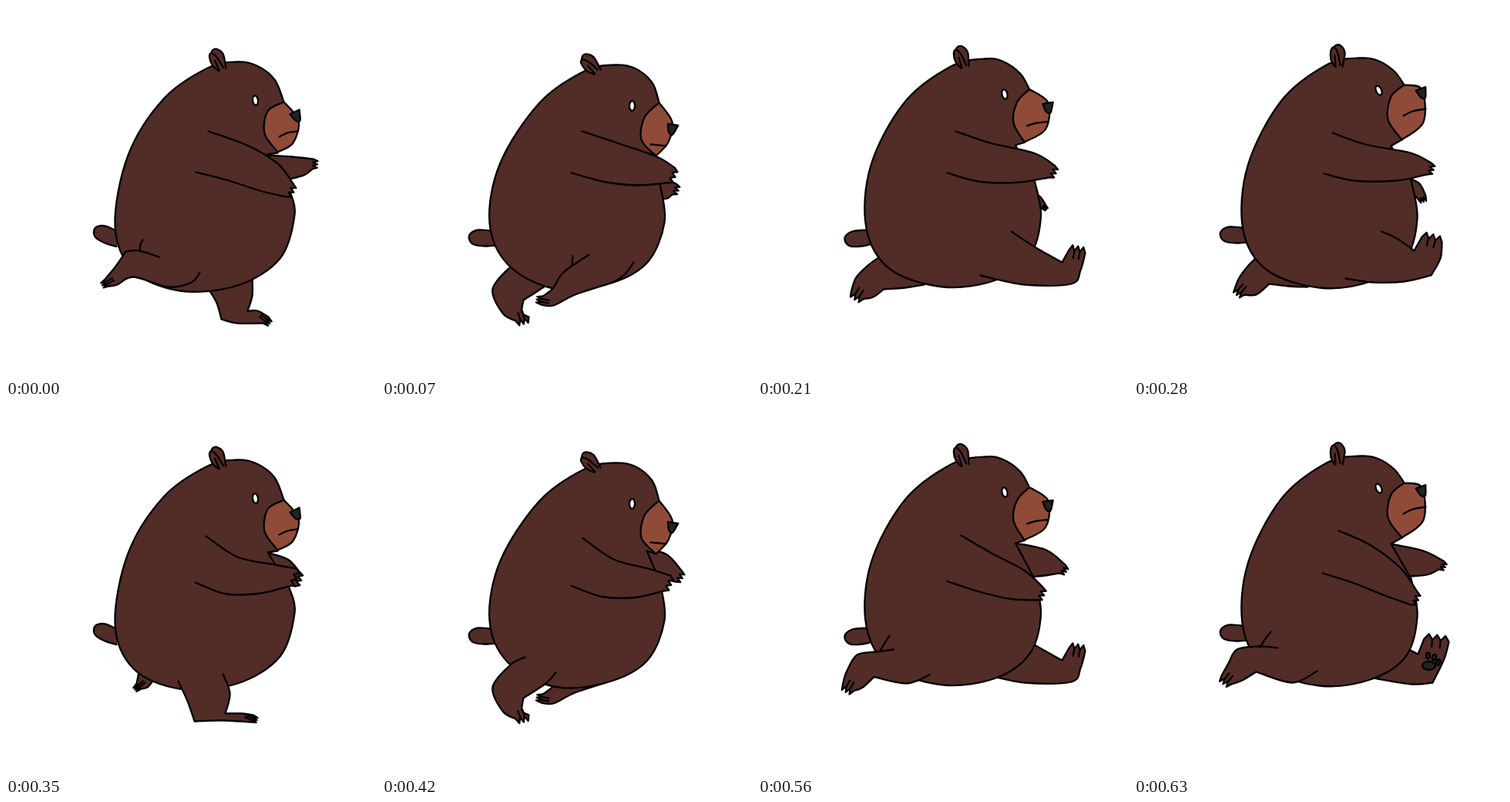
Animation, 480 px wide and 480 px high, one loop 0.7 s. Source, as an HTML page:

```html
<!DOCTYPE html>
<html lang="en">
<head>
<meta charset="utf-8">
<title>Running bear</title>
<style>
  html, body { margin: 0; width: 100%; height: 100%; overflow: hidden; background: #fff; }
  svg { display: block; width: 100%; height: 100%; stroke: #000; stroke-width: 2.3; stroke-linejoin: round; stroke-linecap: round; }
</style>
</head>
<body>
<svg viewBox="0 0 480 480"><g id="stage" transform="translate(.5 .5)"></g></svg>
<script>
const FUR = '#522c27', MUZZLE = '#8f4b38', DARK = '#222';
const STEP = 70, CLAWS = 3;

const numbers = text => text.split(',').map(Number);
const lerp = (a, b, k) => a.map((v, i) => v + (b[i] - v) * k);

// Smooth curve through key points; " / " marks a corner.
function curve(text) {
  let last = null, d = '';
  for (const part of text.split(' / ')) {
    const pts = part.split(' ').map(numbers);
    if (last) pts.unshift(last);
    else d = 'M' + pts[0];
    for (let i = 0; i < pts.length - 1; i++) {
      const a = pts[i], b = pts[i + 1];
      const before = pts[i - 1] || a, after = pts[i + 2] || b;
      const c1 = a.map((v, k) => v + (b[k] - before[k]) / 6);
      const c2 = b.map((v, k) => v - (after[k] - a[k]) / 6);
      d += `C${c1} ${c2} ${b}`;
    }
    last = pts[pts.length - 1];
  }
  return d;
}

const shape = (text, fill = FUR) => `<path d="${curve(text)}" fill="${fill}"/>`;
const line = text => text ? shape(text, 'none') : '';
const oval = (x, y, rx, ry, turn, fill) =>
  `<ellipse cx="${x}" cy="${y}" rx="${rx}" ry="${ry}" transform="rotate(${turn} ${x} ${y})" fill="${fill}"/>`;
const placed = (spot, content) => {
  const [x, y, turn] = numbers(spot);
  return `<g transform="translate(${x} ${y}) rotate(${turn})">${content}</g>`;
};

// A limb runs clockwise: one side, a row of claws at the "|", the other side.
function limb(text, clawLength, toeLength) {
  const [out, back] = text.split(' | ');
  const a = numbers(out.split(/[ /]+/).pop()), b = numbers(back.split(' ')[0]);
  const width = Math.hypot(b[0] - a[0], b[1] - a[1]);
  const away = [(b[1] - a[1]) / width, (a[0] - b[0]) / width];
  const push = (p, k) => p.map((v, i) => v + away[i] * k);
  let claws = '', toes = '';
  for (let i = 1; i <= CLAWS; i++) {
    const notch = lerp(a, b, i / CLAWS);
    claws += ` / ${push(lerp(a, b, (i - 0.5) / CLAWS), clawLength)} / ${notch}`;
    if (i < CLAWS && toeLength) toes += line(`${notch} ${push(notch, -toeLength)}`);
  }
  const rest = back.split(' ').slice(1).join(' ');
  return shape(`${out}${claws} / ${rest}`) + toes;
}
const arm = text => limb(text, 6, 0);
const leg = text => limb(text, 7, 9);

const EAR = shape('-8,-23 -3,-28 3,-27 8,-18 5,0') +
  shape('-5,0 -10,-9 -10,-21 -6,-25 -1,-17 2,-2') + line('-5,-14 -4,0');
const TAIL = shape('0,-9 -22,-11 -33,-6 -34,2 -28,8 -14,10 0,9');
const NOSE = shape('-7,-2 / 5,-8 / 6,6 0,6 -7,-2', DARK);
const EYE = oval(0, 0, 3.5, 6.3, 0, '#fff');

function sole(x, y) {
  let pads = oval(x, y, 8.5, 5.5, 0, DARK);
  for (let i = 0; i < 3; i++) {
    const angle = -1.65 + i * 0.65;
    pads += oval(x + 13 * Math.cos(angle), y + 13 * Math.sin(angle), 2.4, 4, 10 * i, DARK);
  }
  return pads;
}

// Gaps in a sequence are filled halfway between their neighbours.
function midway(a, b) {
  const pattern = /-?\d+(\.\d+)?/g;
  const other = JSON.stringify(b).match(pattern);
  let i = 0;
  return JSON.parse(JSON.stringify(a).replace(pattern, n => (+n + +other[i++]) / 2));
}
const fillGaps = list => list.map((item, i) => item || midway(list[i - 1], list[i + 1]));

const torsos = fillGaps([
  {
    body: '360,124 348,95 325,77 299,72 261,80 204,120 158,193 141,285 165,343 225,369 300,362 355,327 374,270 367,238 / 339,192 / 352,190',
    muzzle: '360,124 379,148 372,177 352,189 / 335,165 339,136 360,124',
    mouth: '354,169 365,164 377,162', nose: '375,142,0', eye: '323,122,-8', ear: '280,82,-20', tail: '146,303,20'
  },
  {
    body: '359,125 350,99 327,80 300,76 262,84 204,125 153,203 139,280 163,335 222,366 290,361 343,333 366,280 360,230 / 343,190 / 355,194',
    muzzle: '359,125 376,150 371,176 355,194 / 336,173 340,144 359,125',
    mouth: '348,179 358,180 368,181', nose: '375,158,35', eye: '324,129,2', ear: '279,85,-38', tail: '147,301,0'
  },
  {
    body: '353,113 343,91 320,73 297,69 250,80 189,126 145,205 139,285 170,340 240,363 310,353 352,320 366,270 358,228 / 334,179 / 344,180',
    muzzle: '353,113 379,142 370,169 343,179 / 333,155 338,132 353,113',
    mouth: '348,168 358,167 373,166', nose: '378,149,30', eye: '322,119,0', ear: '271,80,-27', tail: '147,301,-18'
  },
  null,
  {
    body: '350,102 337,84 315,70 292,67 251,75 191,122 147,207 141,290 172,342 240,365 306,357 352,327 367,275 359,226 / 333,181 / 347,173',
    muzzle: '350,102 373,108 375,150 347,173 / 329,147 333,117 350,102',
    mouth: '349,142 361,136 378,133', nose: '372,112,5', eye: '317,109,-25', ear: '265,78,0', tail: '146,297,0'
  }
]);

const pushOff = '225,348 212,362 183,381 / 181,397 190,403 | 173,408 156,398 143,367 166,338 185,328';
const swing = '326,332 315,347 298,358 250,374 222,388 206,387 | 208,376 221,366 235,345 268,322';
const kick = '328,292 360,313 394,332 / 403,316 | 424,320 418,342 406,360 345,361 288,349';

const nearLegs = fillGaps([
  '251,345 240,358 210,364 165,351 144,361 133,363 | 128,354 142,337 155,318 / 172,317 198,325',
  swing,
  '338,292 362,312 377,342 395,356 400,384 | 386,382 375,377 345,371 / 302,341',
  kick,
  '321,292 342,302 363,317 / 373,299 | 399,306 397,327 385,349 / 350,357 310,358 274,353',
  '281,350 290,375 284,401 / 305,401 320,403 | 317,412 280,410 244,411 / 235,385 223,359',
  pushOff,
  '208,355 180,363 142,360 / 131,376 122,380 | 106,374 107,357 123,332 145,328 164,320',
  null,
  '237,346 205,361 158,347 / 140,358 126,363 | 113,352 122,336 133,318 160,314 186,316'
]);
const farLegs = fillGaps([
  '319,352 319,375 313,395 / 326,395 340,403 | 333,411 300,411 279,406 / 273,385 263,368',
  pushOff,
  '205,358 180,367 150,374 / 140,380 130,385 | 110,375 118,351 140,333 158,323',
  null,
  '225,364 200,363 175,360 / 158,374 143,374 | 131,364 136,352 148,336 157,327',
  '189,360 183,367 175,369 | 169,362 172,347',
  swing,
  '352,318 356,346 380,358 384,383 | 356,382 330,370 314,365 / 312,350',
  kick,
  '356,318 368,324 / 376,304 | 408,308 402,330 387,361 / 360,363 310,355'
]);
const nearArms = fillGaps([
  '262,162 312,180 352,204 372,230 | 363,247 332,240 285,225 246,215',
  '259,162 310,179 356,195 379,209 | 370,229 330,232 290,228 245,216',
  '255,160 300,175 358,191 384,210 | 374,226 330,231 285,228 244,215',
  null,
  '257,164 300,179 358,190 385,203 | 380,218 340,226 285,226 246,217',
  '259,171 300,198 348,208 376,213 | 366,236 330,245 285,246 245,231',
  null,
  '261,176 300,204 345,219 371,231 | 364,248 325,256 285,253 246,240',
  null,
  '265,164 305,182 345,212 367,243 | 359,260 325,248 285,232 244,219'
]);
const farArms = fillGaps([
  '338,193 370,195 398,198 | 397,211 386,219 368,224',
  '355,230 368,226 381,230 | 376,244 370,249 360,250',
  '352,262 360,263 366,267 | 366,273 360,274 352,274',
  null,
  '354,222 370,230 378,246 | 368,250 364,246 354,240',
  '338,192 365,201 380,217 | 374,236 366,234 350,230',
  null,
  '334,179 372,188 396,214 | 386,224 372,222 357,224',
  null,
  '333,181 375,190 401,203 | 395,214 380,221 357,223'
]);
// Fold of the hip above a trailing near leg.
const hips = {
  0: '177,303 174,309 173,317', 1: '247,324 246,336',
  7: '164,304 161,313 155,322', 8: '170,300 165,308 159,318', 9: '177,295 170,304 163,315'
};
const LAST = nearLegs.length - 1;

function draw(index) {
  const torso = torsos[index % torsos.length];
  return placed(torso.tail, TAIL) +
    arm(farArms[index]) +
    leg(farLegs[index]) + (index === LAST ? sole(382, 339) : '') +
    shape(torso.body) + shape(torso.muzzle, MUZZLE) + line(torso.mouth) +
    placed(torso.nose, NOSE) + placed(torso.eye, EYE) + placed(torso.ear, EAR) +
    leg(nearLegs[index]) + line(hips[index]) +
    arm(nearArms[index]);
}

const stage = document.getElementById('stage');
const start = performance.now();
let shown = -1;

function update() {
  const index = Math.floor((performance.now() - start) / STEP) % nearLegs.length;
  if (index !== shown) stage.innerHTML = draw(shown = index);
  requestAnimationFrame(update);
}
update();
</script>
</body>
</html>
```
